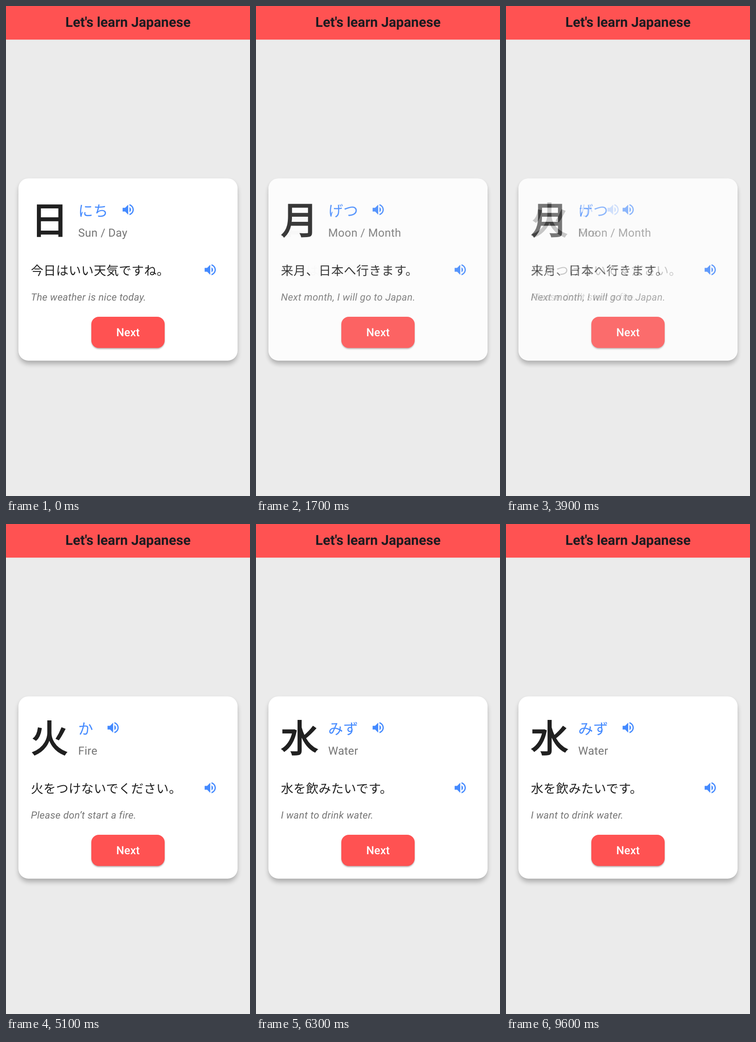
Animation of 529x1058 px, one loop 9.7 s. Source, as an HTML page:

```html
<!DOCTYPE html>
<html lang="ja">
<head>
<meta charset="utf-8">
<title>Let's learn Japanese</title>
<style>
  html, body { margin: 0; width: 100%; height: 100%; overflow: hidden; background: #ebebeb; }
  svg { display: block; width: 100%; height: 100%; }
  text { font-family: Roboto, "Noto Sans CJK JP", "Noto Sans CJK", sans-serif; text-rendering: geometricPrecision; }
  .title { font-size: 29.6px; font-weight: 700; fill: #1d1b20; text-anchor: middle; }
  .kanji, .kana, .sentence { font-family: "Noto Sans CJK JP", "Noto Sans CJK", sans-serif; letter-spacing: .34px; }
  .kanji { font-size: 80.8px; fill: #202020; stroke: #202020; stroke-width: 2.5px; }
  .kana { font-size: 32.33px; fill: #448aff; }
  .sentence { font-size: 26.94px; fill: #202020; }
  .meaning { font-size: 24.25px; fill: #757575; letter-spacing: .34px; }
  .translation { font-size: 21.55px; font-style: italic; fill: #757575; letter-spacing: .34px; }
  .next { font-size: 24.25px; font-weight: 500; fill: #fff; letter-spacing: .13px; text-anchor: middle; }
  .icon { fill: #448aff; }
</style>
</head>
<body>
<svg id="stage" viewBox="0 0 529 1058">
  <defs>
    <filter id="soft" x="-10%" y="-10%" width="120%" height="120%"><feGaussianBlur stdDeviation="5.5"/></filter>
    <filter id="tight" x="-10%" y="-20%" width="120%" height="140%"><feGaussianBlur stdDeviation="1.5"/></filter>
    <path id="speaker" d="M3 9v6h4l5 5V4L7 9H3zm13.5 3c0-1.77-1.02-3.29-2.5-4.03v8.05c1.48-.73 2.5-2.25 2.5-4.02zM14 3.23v2.06c2.89.86 5 3.54 5 6.71s-2.11 5.85-5 6.71v2.06c4.01-.91 7-4.49 7-8.77s-2.99-7.86-7-8.77z"/>
  </defs>
  <rect width="529" height="1058" fill="#ebebeb"/>
  <rect width="529" height="72.6" fill="#ff5252"/>
  <text class="title" x="264.5" y="45">Let's learn Japanese</text>
  <g id="cards"></g>
</svg>
<script>
const LOOP = 9700;
const FADE = 500;
const DP = 529 / 392.73;

const words = [
  { start: -FADE, kanji: '日', kana: 'にち', meaning: 'Sun / Day',
    sentence: '今日はいい天気ですね。', translation: 'The weather is nice today.' },
  { start: 1267, kanji: '月', kana: 'げつ', meaning: 'Moon / Month',
    sentence: '来月、日本へ行きます。', translation: 'Next month, I will go to Japan.' },
  { start: 3785, kanji: '火', kana: 'か', meaning: 'Fire',
    sentence: '火をつけないでください。', translation: 'Please don’t start a fire.' },
  { start: 5725, kanji: '水', kana: 'みず', meaning: 'Water',
    sentence: '水を飲みたいです。', translation: 'I want to drink water.' }
];

const label = (cls, x, y, str) => `<text class="${cls}" x="${x}" y="${y}">${str}</text>`;

const speaker = (cx, cy) =>
  `<use href="#speaker" class="icon" transform="translate(${cx} ${cy}) scale(${DP}) translate(-12 -12)"/>`;

const box = (x, y, w, h, r, fill, extra = '') =>
  `<rect x="${x}" y="${y}" width="${w}" height="${h}" rx="${r}" fill="${fill}" ${extra}/>`;

function card(w) {
  return '<g>' +
    box(28, 379.5, 473, 393, 21, '#000', 'opacity=".27" filter="url(#soft)"') +
    box(27, 372.2, 475, 393.5, 21.5, '#fff') +
    label('kanji', 53.9, 492.3, w.kanji) +
    label('kana', 156.6, 453.8, w.kana) +
    speaker(199.6 + 32.67 * w.kana.length, 439.7) +
    label('meaning', 156.6, 497.5, w.meaning) +
    label('sentence', 53.9, 581.2, w.sentence) +
    speaker(442.8, 569.6) +
    label('translation', 53.9, 636, w.translation) +
    box(185.2, 673.2, 158.6, 67.3, 16.2, '#000', 'opacity=".3" filter="url(#tight)"') +
    box(185, 671.1, 159, 67.4, 16.2, '#ff5252') +
    label('next', 264.5, 713, 'Next') +
    '</g>';
}

const holder = document.getElementById('cards');
holder.innerHTML = words.map(card).join('');
const groups = [...holder.children];

// How far a word has faded in; nothing follows the last one.
function shown(i, t) {
  if (i >= words.length) return 0;
  return Math.min(1, Math.max(0, (t - words[i].start) / FADE));
}

function frame() {
  const t = performance.now() % LOOP;
  groups.forEach((g, i) => {
    const alpha = shown(i, t) * (1 - shown(i + 1, t));
    g.setAttribute('opacity', alpha.toFixed(4));
    g.setAttribute('visibility', alpha > 0 ? 'visible' : 'hidden');
  });
  requestAnimationFrame(frame);
}
frame();
</script>
</body>
</html>
```
